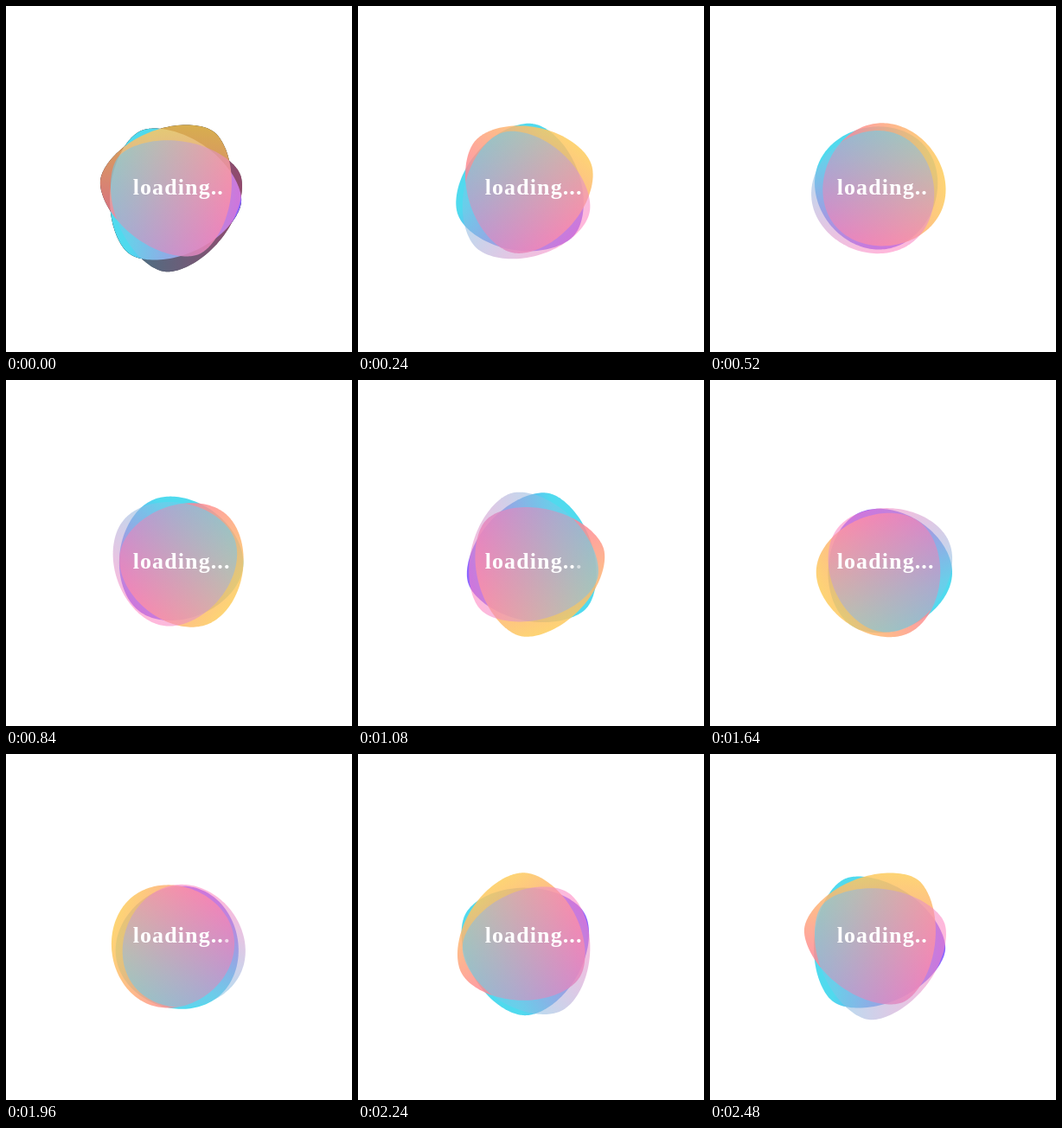
Recreate the animation shown at these times as an HTML page with a canvas. Size 400x400 px, loop 2520 ms.

```html
<!DOCTYPE html>
<html lang="en">
<head>
<meta charset="utf-8">
<title>Loading</title>
<style>
html, body { margin: 0; width: 100%; height: 100%; overflow: hidden; background: #fff; }
canvas { display: block; width: 400px; height: 400px; }
</style>
</head>
<body>
<canvas id="stage" width="400" height="400"></canvas>
<script>
const ctx = document.getElementById('stage').getContext('2d');
const STEP = 40, STEPS = 63, LOOP = STEP * STEPS, TURN = LOOP - STEP;
const RAD = Math.PI / 180;

// pivot: rotation centre, offset: blob centre, corner: direction of one lobe,
// slope: gradient direction, inset: where the gradient starts, in radii.
// Angles are in degrees at the start of the loop.
const blobs = [
  { pivot: [198, 216], offset: [-8, 3.2], corner: 5, slope: 12, inset: -0.45, alpha: 1,
    from: 'rgb(80,218,238)', to: 'rgb(142,103,255)' },
  { pivot: [198, 216], offset: [-7.2, -4.8], corner: 187, slope: 95, inset: -1, alpha: 0.85,
    from: 'rgb(253,205,92)', to: 'rgb(255,108,174)' },
  { pivot: [198.4, 217.5], offset: [-4, 8], corner: 98, slope: 0, inset: -1, alpha: 0.57,
    from: 'rgb(100,210,238)', to: 'rgb(255,130,192)' }
];

// Curve of constant width with three lobes, built from its support function.
function tracePath(corner, radius, bulge) {
  ctx.beginPath();
  for (let deg = 0; deg < 360; deg += 2) {
    const t = deg * RAD, phase = 3 * (deg - corner) * RAD;
    const h = radius + bulge * Math.cos(phase);
    const dh = -3 * bulge * Math.sin(phase);
    ctx.lineTo(h * Math.cos(t) - dh * Math.sin(t), h * Math.sin(t) + dh * Math.cos(t));
  }
  ctx.closePath();
}

function drawBlob(blob, time, backdrop) {
  const turn = 2 * Math.PI * time / TURN;
  const morph = Math.abs(Math.cos(turn));
  const radius = 71 + 5 * morph ** 3;
  ctx.save();
  ctx.translate(...blob.pivot);
  ctx.rotate(turn);
  ctx.translate(...blob.offset);
  tracePath(blob.corner, radius, 6.3 * morph);
  if (backdrop) {
    ctx.fillStyle = '#000';
  } else {
    const x = radius * Math.cos(blob.slope * RAD), y = radius * Math.sin(blob.slope * RAD);
    const gradient = ctx.createLinearGradient(x * blob.inset, y * blob.inset, x, y);
    gradient.addColorStop(0, blob.from);
    gradient.addColorStop(1, blob.to);
    ctx.fillStyle = gradient;
    ctx.globalAlpha = blob.alpha;
  }
  ctx.fill();
  ctx.restore();
}

function drawText(time) {
  const phase = time % (TURN / 4) / (TURN / 4);
  const fade = Math.min((phase - 0.03) / 0.2, (0.82 - phase) / 0.15);
  const label = 'loading..', left = 146.7, baseline = 218;
  ctx.font = 'bold 26px "Liberation Serif", "Times New Roman", serif';
  ctx.letterSpacing = '1.1px';
  ctx.fillStyle = '#fff';
  ctx.fillText(label, left, baseline);
  ctx.globalAlpha = Math.max(0, Math.min(1, fade));
  ctx.fillText('.', left + ctx.measureText(label).width, baseline);
  ctx.globalAlpha = 1;
}

function render(now) {
  const time = Math.floor(now % LOOP / STEP) * STEP;
  ctx.fillStyle = '#fff';
  ctx.fillRect(0, 0, 400, 400);
  // The loop opens with the translucent layers over black for one step.
  if (time === 0) blobs.forEach(blob => drawBlob(blob, time, true));
  blobs.forEach(blob => drawBlob(blob, time, false));
  drawText(time);
}

const start = performance.now();
function tick() {
  render(performance.now() - start);
  requestAnimationFrame(tick);
}
tick();
</script>
</body>
</html>
```
